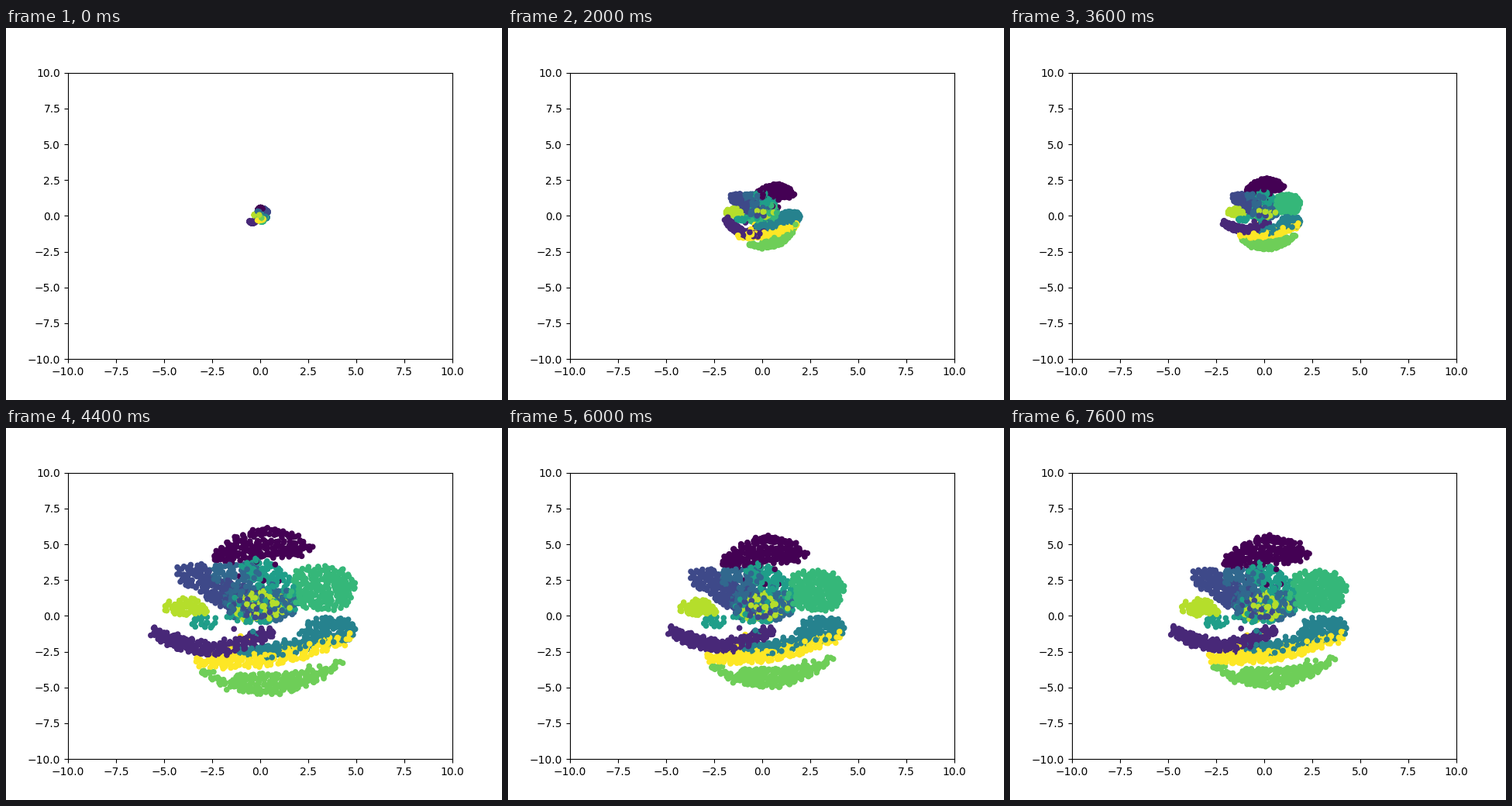
Recreate the animation shown at these times as a matplotlib script. Size 640 by 480 pixels, loop 8000 ms.

```python
import numpy as np
import matplotlib.pyplot as plt
from matplotlib.animation import FuncAnimation

rng = np.random.default_rng(7)
FRAMES = 20
PER_LABEL = 250

# One row per label; strokes are half width, start x, y, end x, y, rise at the middle
STROKES = [
    [(0.25, -2.1, 3.5, 2.3, 4.2, 1.5), (0.6, -1.9, 3.7, 1.9, 4.1, 0.4)],
    [(0.42, -4.8, -0.9, 0.5, -0.9, -1.2)],
    [(0.75, -3.6, 2.4, -2.3, 2.8, 0), (0.85, -2.5, 1.9, 0.4, 0.3, 0)],
    [(0.6, -2.3, 2.8, 0.2, 2.7, 0), (1.1, -1.7, 1.2, 1.5, 0.6, 0)],
    [(0.8, 4.2, -0.7, 2, -1.2, 0), (0.42, 2.6, -1.5, -0.9, -2.3, -0.2)],
    [(0.8, -0.6, 2.9, 1.4, 0.3, 0.9), (0.4, -3.1, -0.4, -2, -0.4, 0), (0.9, -1.4, 0.3, 0.8, 0.5, 0)],
    [(1.35, 1.5, 1.9, 4.1, 1.6, 0)],
    [(0.27, -2.6, -3.5, 3.6, -2.9, -1.5), (0.4, -1.1, -3.9, 2.6, -3.6, -0.3)],
    [(0.5, -4.2, 0.3, -2.5, 0.3, 0.3), (0.9, -1.2, 0.7, 1.2, 0.6, 0)],
    [(0.42, -2.8, -2.9, 4.1, -1.2, -0.6)],
]

# Starting places of clusters that do not begin near their settled direction
START = {1: (-0.4, -0.45), 2: (0.28, 0.35), 6: (0.1, -0.28), 7: (0.1, -0.15)}

# Shift x, y and turn in degrees while the clusters reorder
SWAY = {0: (0.65, -0.38, -10), 1: (0, -0.2, -25), 4: (0.1, 0.35, 0),
        6: (-1.1, -0.6, 0), 7: (0.45, 0.27, 25)}
SWAY_KEYS, SWAY_AMOUNT = (1, 4, 5, 9), (0.4, 0.9, 1, 0)

SCALE_KEYS = (1, 2, 5, 9, 10, 11, 12, 13)
SCALE_X = (0.39, 0.47, 0.44, 0.44, 0.85, 1.16, 1.09, 1)
SCALE_Y = (0.44, 0.49, 0.47, 0.47, 0.79, 1.10, 1.08, 1)


def brush(count, width, x0, y0, x1, y1, rise):
    """Spread points evenly over a tapered, bent stroke."""
    i = np.arange(count)
    u = (rng.random() + i * 0.754878) % 1
    v = (rng.random() + i * 0.569840) % 1 * 2 - 1
    k = 2 * u - 1
    x = x0 + (x1 - x0) * u
    y = y0 + (y1 - y0) * u + rise * (1 - k * k)
    slope = np.arctan2(y1 - y0 - 4 * rise * k, x1 - x0)
    reach = v * width * np.sqrt(1 - 0.85 * np.abs(k) ** 3)
    jitter = rng.normal(0, 0.05 + 0.04 * width, (count, 2))
    return np.c_[x - reach * np.sin(slope), y + reach * np.cos(slope)] + jitter


def cluster(strokes):
    """Share the points among strokes by area and let a few stray inward."""
    area = np.array([w * (np.hypot(x1 - x0, y1 - y0) + abs(rise))
                     for w, x0, y0, x1, y1, rise in strokes])
    counts = np.round(PER_LABEL * area / area.sum()).astype(int)
    points = np.concatenate([brush(n, *s) for n, s in zip(counts, strokes)])
    stray = rng.random(len(points)) < 0.04
    points[stray] *= rng.uniform(0.4, 1, (stray.sum(), 1))
    return points


groups = [cluster(strokes) for strokes in STROKES]
labels = np.repeat(np.arange(len(groups)), [len(g) for g in groups])
settled = np.concatenate(groups)
order = rng.permutation(len(labels))
labels, settled = labels[order], settled[order]

means = np.array([g.mean(axis=0) for g in groups])
centres = means[labels]
starts = np.array([START.get(k, 0.11 * m) for k, m in enumerate(means)])[labels]
sway = np.array([SWAY.get(k, (0, 0, 0)) for k in range(len(groups))])[labels]
drift = rng.normal(0, 0.04, settled.shape)


def layout(frame):
    if frame == 0:
        return starts + (settled - centres) * (0.06, 0.09)
    scale = np.array([np.interp(frame, SCALE_KEYS, s) for s in (SCALE_X, SCALE_Y)])
    dx, dy, turn = (np.interp(frame, SWAY_KEYS, SWAY_AMOUNT) * sway).T
    cos, sin = np.cos(np.radians(turn)), np.sin(np.radians(turn))
    x, y = ((settled - centres) * scale).T
    turned = np.c_[x * cos - y * sin, x * sin + y * cos]
    settling = max(0, frame - 13) / 6
    return centres * scale + turned + np.c_[dx, dy] + drift * settling


fig, ax = plt.subplots(figsize=(6.4, 4.8), dpi=100)
ax.set_xlim(-10, 10)
ax.set_ylim(-10, 10)
dots = ax.scatter(*layout(0).T, s=20, c=labels, cmap="viridis")


def update(frame):
    dots.set_offsets(layout(frame))
    return (dots,)


anim = FuncAnimation(fig, update, frames=FRAMES, interval=400, repeat=True, repeat_delay=0)
plt.show()
```
